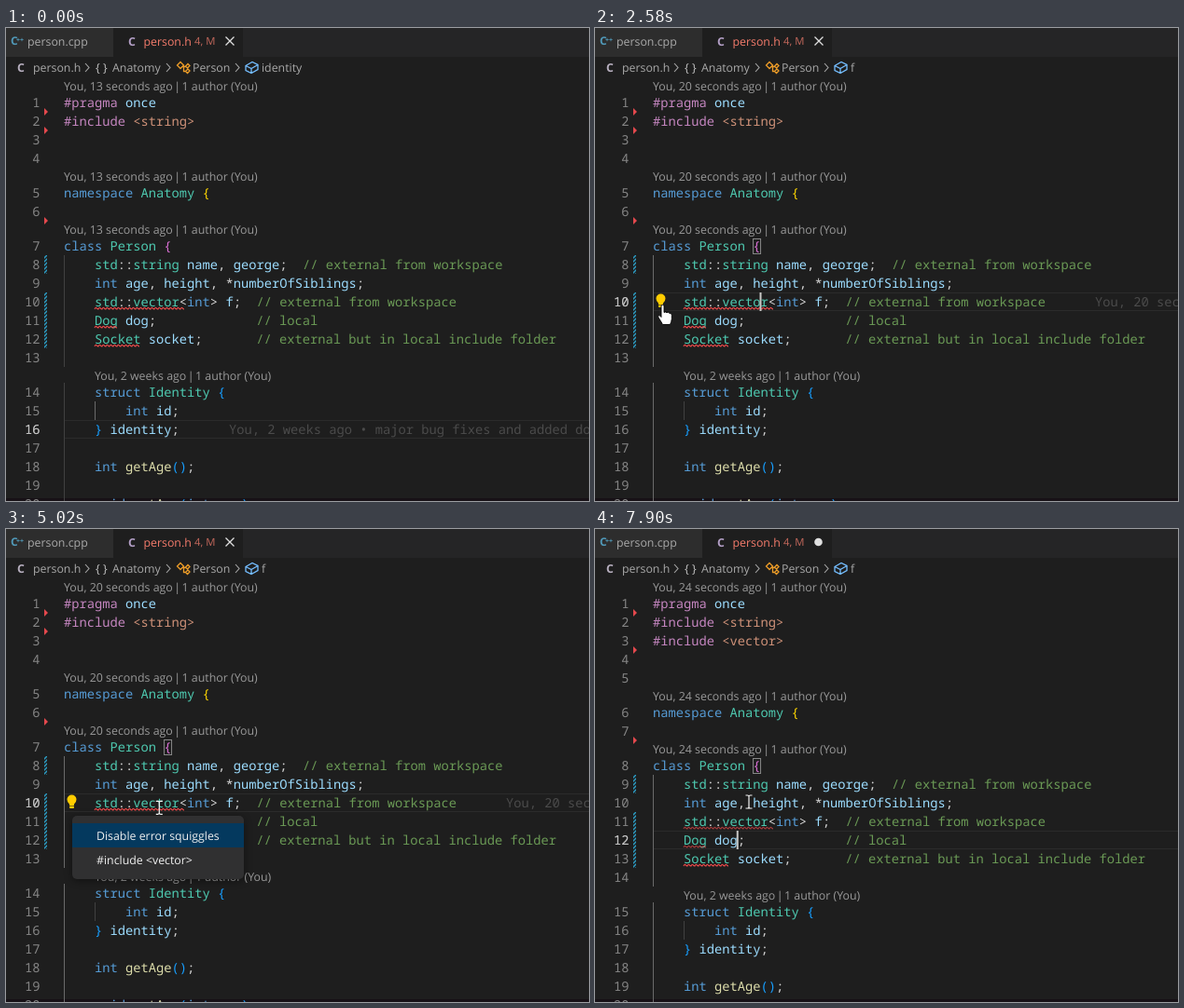
An HTML page that plays this animation: 625x508 px, repeating every 8000 ms.

```html
<!DOCTYPE html>
<html lang="en">
<head>
<meta charset="utf-8">
<title>Include quick fix</title>
<style>
  html, body { margin: 0; width: 100%; height: 100%; overflow: hidden; background: #1e1e1e; }
  svg { display: block; }
  text { white-space: pre; text-rendering: geometricPrecision; }
  .ui { font: 12.35px "Open Sans", "Noto Sans", sans-serif; fill: #a9a9a9; }
  .lens { font: 12.4px "Open Sans", "Noto Sans", sans-serif; fill: #999; }
  .code { font: 13.75px "Noto Sans Mono", "DejaVu Sans Mono", monospace; font-variant-ligatures: none; fill: #d4d4d4; }
  .num { fill: #858585; text-anchor: end; }
  .num.now { fill: #c6c6c6; }
  .blame { fill: #4b4b4b; }
  .line { fill: none; stroke: #2b2b2b; }
  .wave { fill: none; stroke: #f14c4c; stroke-width: 1.1; }
  .guide { fill: #404040; }
  .guide.active { fill: #6a6a6a; }
  .caret { fill: #c8c8c6; }
  .match { fill: none; stroke: #888; }
  .menu { filter: drop-shadow(0 2px 4px rgba(0, 0, 0, .4)); }
  .chevron, .icon { fill: none; stroke: #a9a9a9; stroke-width: 1.1; }
</style>
</head>
<body>
<svg id="stage" width="625" height="508" viewBox="0 0 625 508">
  <defs>
    <pattern id="hatch" width="4" height="4" patternUnits="userSpaceOnUse">
      <path d="M-1 5L5 -1M-1 1L1 -1M3 5L5 3" stroke="#2b9cc4" stroke-width="1.5"/>
    </pattern>
  </defs>
  <rect width="625" height="508" fill="#1e1e1e"/>
  <rect y="505" width="625" height="3" fill="#171116"/>

  <rect width="625" height="31" fill="#252526"/>
  <rect width="115" height="31" fill="#2d2d2d"/>
  <rect x="115" width="139" height="31" fill="#1e1e1e"/>
  <g class="ui">
    <g style="fill:#519aba;font-weight:700">
      <text x="5" y="18" font-size="12">C</text>
      <text x="11" y="15" style="font-size:7px">++</text>
    </g>
    <text x="23" y="18.5">person.cpp</text>
    <text x="131" y="18.5" style="fill:#b39fc6;font-weight:700">C</text>
    <text x="147.500" y="18.5" style="fill:#f57c6c">person.h</text>
    <text x="202" y="18" style="fill:#c4685c;font-size:11.3px">4, M</text>
    <path data-on="0-7160" d="M235.500 9.500l9 9m0 -9l-9 9" stroke="#e0e0e0" stroke-width="1.3"/>
    <circle data-on="7160-8000" cx="239.500" cy="14" r="4.300" fill="#e0e0e0"/>

    <text x="12" y="47" style="fill:#b8b0c0;font-weight:700">C</text>
    <text x="29" y="47">person.h</text>
    <text x="96" y="46.500" style="fill:#c5c5c5">{ }</text>
    <text x="114" y="47">Anatomy</text>
    <text x="200" y="47">Person</text>
    <text data-on="0-1480" x="274" y="47">identity</text>
    <text data-on="1480-8000" x="274" y="47">f</text>
  </g>
  <path class="chevron" d="M85 38l4 4.500l-4 4.500M172 38l4 4.500l-4 4.500M246 38l4 4.500l-4 4.500"/>
  <path class="icon" style="stroke:#ee9d28;stroke-width:1.300"
    d="M187 36.500l3.500 3.500l-3.500 3.500l-3.500 -3.500zM189.500 41.500h4M190.500 41.500v5h3M195 38.500l2 2l-2.500 2.500l-2 -2zM195 44l2 2l-2.500 2.500l-2 -2z"/>
  <path class="icon" style="stroke:#75beff;stroke-width:1.300"
    d="M257 40.500l7 -4l6 3v5l-7 4l-6 -3zM257 40.500l6 3l7 -4M263 43.500v5"/>

  <g id="before" data-on="0-7160"></g>
  <g id="after" data-on="7160-8000"></g>

  <g data-on="1940-7090" fill="#ffcc00">
    <path d="M68 295.500Q65.500 293.500 65.500 290.500A5 5 0 0 1 75.500 290.500Q75.500 293.500 73 295.500V297H68Z"/>
    <rect x="68" y="297.500" width="5" height="2.500" rx="1"/>
  </g>
  <g id="menus"></g>

  <g id="pointer" data-on="520-8000">
    <circle data-on="1340-1480,3140-3210,5150-5290,5700-5770" r="12.500" fill="#c4b01c" fill-opacity=".8"/>
    <path data-on="520-2440,4950-6230,7090-8000" fill="none" stroke="#f4f4f4" stroke-width="1.200"
      d="M-3.500 -7H-1.500Q0 -7 0 -5.500V5.500Q0 7 -1.500 7H-3.500M3.500 -7H1.500Q0 -7 0 -5.500M0 5.500Q0 7 1.500 7H3.500"/>
    <path data-on="2440-4950" fill="#fff" stroke="#000" stroke-width=".9"
      d="M-1.500 .5Q0 -1 1.500 .5V8Q3 6.800 4.500 8.200Q6 7.300 7.300 8.800Q9.800 8.400 9.800 11V15Q9.500 18 8 21H0Q-2 17 -4.500 13.500Q-5.500 11 -3.500 11L-1.500 13Z"/>
    <path data-on="6230-7090" fill="#fff" stroke="#000" stroke-width=".8"
      d="M0 0V15L3.500 11.800L6 17.500L8.300 16.500L5.900 11H10.600Z"/>
  </g>
</svg>
<script>
const LOOP = 8000, LEFT = 62, CHAR = 8.25, ROW = 20, LENS = 17;
const col = n => LEFT + n * CHAR;

function add(parent, tag, attrs, text) {
  const node = document.createElementNS("http://www.w3.org/2000/svg", tag);
  for (const key in attrs) node.setAttribute(key, attrs[key]);
  if (text !== undefined) node.textContent = text;
  return parent.appendChild(node);
}

// Syntax colours
const keywords = /^(namespace|class|struct|int|void)$/;
const types = /^(std|string|vector|Anatomy|Person|Identity|Dog|Socket)$/;
const brackets = ["#ffd700", "#da70d6", "#179fff"];
let depth = 0;

function colour(token) {
  if (token.startsWith("//")) return "#6a9955";
  if (token[0] === "#") return "#c586c0";
  if (/^<\w/.test(token)) return "#ce9178";
  if (keywords.test(token)) return "#569cd6";
  if (types.test(token)) return "#4ec9b0";
  if (/^[gs]etAge$/.test(token)) return "#dcdcaa";
  if (/[{(]/.test(token)) return brackets[depth++];
  if (/[})]/.test(token)) return brackets[--depth];
  return /\w/.test(token) ? "#9cdcfe" : "#d4d4d4";
}

function codeLine(parent, y, source) {
  const line = add(parent, "text", { class: "code", x: LEFT, y });
  for (const token of source.match(/\/\/.*|#\w+|<(?:string|vector)>|\w+|\s+|./g) || [])
    add(line, "tspan", { fill: colour(token) }, token);
}

function lens(parent, x, y, age, on) {
  const line = add(parent, "text", { class: "lens", x, y, "data-on": on });
  add(line, "tspan", {}, `You, ${age} ago `);
  add(line, "tspan", { dx: -1.8 }, "|");
  add(line, "tspan", { dx: -1.8 }, " 1 author (You)");
}

function wave(parent, y, chars, opacity) {
  let d = `M${col(4)} ${y}`;
  for (let x = 0; x + 4 <= chars * CHAR; x += 4) d += "q1 -2.600 2 -1.300t2 1.300";
  add(parent, "path", { class: "wave", d, opacity });
}

// "@" is a lens with seconds, "@@" a nested lens
const rows = [
  "@", "#pragma once", "#include <string>", "", "",
  "@", "namespace Anatomy {", "",
  "@", "class Person {",
  "    std::string name, george;  // external from workspace",
  "    int age, height, *numberOfSiblings;",
  "    std::vector<int> f;  // external from workspace",
  "    Dog dog;             // local",
  "    Socket socket;       // external but in local include folder",
  "",
  "@@", "    struct Identity {", "        int id;", "    } identity;", "",
  "    int getAge();", "", "    void setAge(int age);"
];

// current: line number -> times when it holds the caret
function buildEditor(id, source, current, ages) {
  const root = document.getElementById(id);
  let top = 53, number = 0, inClass = false;
  const tops = {};
  depth = 0;
  for (const row of source) {
    if (row[0] === "@") {
      if (row === "@@") lens(root, col(4), top + 13.5, "2 weeks", "0-8000");
      else for (const [age, on] of ages) lens(root, LEFT, top + 13.5, age + " seconds", on);
      top += LENS;
      continue;
    }
    number++;
    tops[number] = top;
    const base = top + 15, on = current[number];
    add(root, "text", { class: "code num", x: 36.5, y: base }, number);
    if (on) {
      add(root, "rect", { class: "line", x: LEFT + .5, y: top + .5, width: 570, height: 19, "data-on": on });
      add(root, "text", { class: "code num now", x: 36.5, y: base, "data-on": on }, number);
    }
    if (inClass) {
      const guide = { x: LEFT, y: top, width: 1, height: ROW };
      add(root, "rect", { class: "guide", ...guide });
      add(root, "rect", { class: "guide active", ...guide, "data-on": "1410-8000" });
    }
    if (row.includes("int id")) {
      const guide = { x: col(4), y: top, width: 1, height: ROW };
      add(root, "rect", { class: "guide", ...guide });
      add(root, "rect", { class: "guide active", ...guide, "data-on": "0-1410" });
    }
    if (/std|Dog|Socket/.test(row))
      add(root, "rect", { x: 41, y: top, width: 3, height: ROW, fill: "url(#hatch)" });
    codeLine(root, base, row);
    const faded = id === "after" ? .65 : 1;
    if (row.includes("std::vector")) wave(root, top + 18, 12, faded);
    if (row.includes("Dog")) wave(root, top + 18, 3, faded);
    if (row.includes("Socket")) wave(root, top + 18, 6, 1);
    if (row.startsWith("class")) {
      inClass = true;
      add(root, "rect", { class: "match", x: col(13) + .3, y: top + 2.5, width: 8, height: 16, "data-on": "1410-8000" });
    }
    top += ROW;
  }
  return { root, tops };
}

function caret({ root, tops }, line, column, on) {
  add(root, "rect", { class: "caret", x: col(column) - 1, y: tops[line], width: 2, height: ROW, "data-on": on });
}

function blame({ root, tops }, line, x, text, on) {
  add(root, "text", { class: "code blame", x, y: tops[line] + 15, "data-on": on }, text);
}

function marker({ root }, y, on) {
  add(root, "path", { d: `M41 ${y - 4}l4 4l-4 4z`, fill: "#e5484d", "data-on": on });
}

const before = buildEditor("before", rows, { 10: "1410-8000", 16: "0-1410" },
  [[13, "0-2150"], [20, "2150-5770"], [24, "5770-8000"]]);
blame(before, 16, 239, "You, 2 weeks ago • major bug fixes and added documentation", "0-1410");
blame(before, 10, 536, "You, 20 seconds ago", "1600-8000");
caret(before, 10, 14, "1410-1940,2440-2970,5220-5700");
caret(before, 10, 12, "5700-6160");
for (const y of [90, 110, 207]) marker(before, y, "0-8000");

const edited = [...rows];
edited.splice(3, 0, "#include <vector>");
const after = buildEditor("after", edited, { 11: "0-7630", 12: "7630-8000" }, [[24, "0-8000"]]);
caret(after, 11, 12, "7160-7630");
caret(after, 12, 12, "7630-7900");
caret(after, 12, 11, "7900-8000");
marker(after, 90, "0-8000");
marker(after, 110, "0-7370");
marker(after, 130, "7370-8000");
marker(after, 227, "0-8000");

function menu(x, y, on, firstOn, secondOn) {
  const box = add(document.getElementById("menus"), "g",
    { class: "menu", transform: `translate(${x} ${y})`, "data-on": on });
  add(box, "rect", { width: 184, height: 68, rx: 5, fill: "#303031" });
  [["Disable error squiggles", firstOn], ["#include <vector>", secondOn]].forEach(([label, on], i) => {
    const top = 8 + 26 * i;
    add(box, "rect", { y: top, width: 184, height: 26, fill: "#04395e", "data-on": on });
    add(box, "text", { class: "ui", x: 26, y: top + 17.5, style: "fill:#f0f0f0" }, label);
  });
}
menu(71, 308, "3210-5220", "3210-3820,4740-5220", "3820-4740");
menu(95, 306, "6160-7090", "6160-6830", "6830-7090");

// Pointer path: time, x, y
const path = [
  [520, 580, 484], [1210, 177.5, 297], [1940, 177.5, 297], [2580, 72.5, 297.5],
  [3600, 72.5, 297.5], [3940, 178.5, 348], [4600, 178.5, 348], [5150, 162, 291.5],
  [7089, 162.5, 291.5], [7090, 165, 293], [LOOP, 165, 293]
];

function position(t) {
  if (t <= path[0][0]) return path[0].slice(1);
  const i = path.findIndex(p => p[0] > t);
  const [t0, x0, y0] = path[i - 1], [t1, x1, y1] = path[i];
  const k = (t - t0) / (t1 - t0), e = k * k * (3 - 2 * k);
  return [x0 + (x1 - x0) * e, y0 + (y1 - y0) * e];
}

const timed = [...document.querySelectorAll("[data-on]")].map(node =>
  [node, node.dataset.on.split(",").map(span => span.split("-").map(Number))]);
const pointer = document.getElementById("pointer");
const start = performance.now();

function update(now) {
  const t = Math.max(0, now - start) % LOOP;
  for (const [node, spans] of timed)
    node.style.display = spans.some(([a, b]) => t >= a && t < b) ? "" : "none";
  pointer.setAttribute("transform", `translate(${position(t).join(" ")})`);
  requestAnimationFrame(update);
}
update(start);
</script>
</body>
</html>
```
